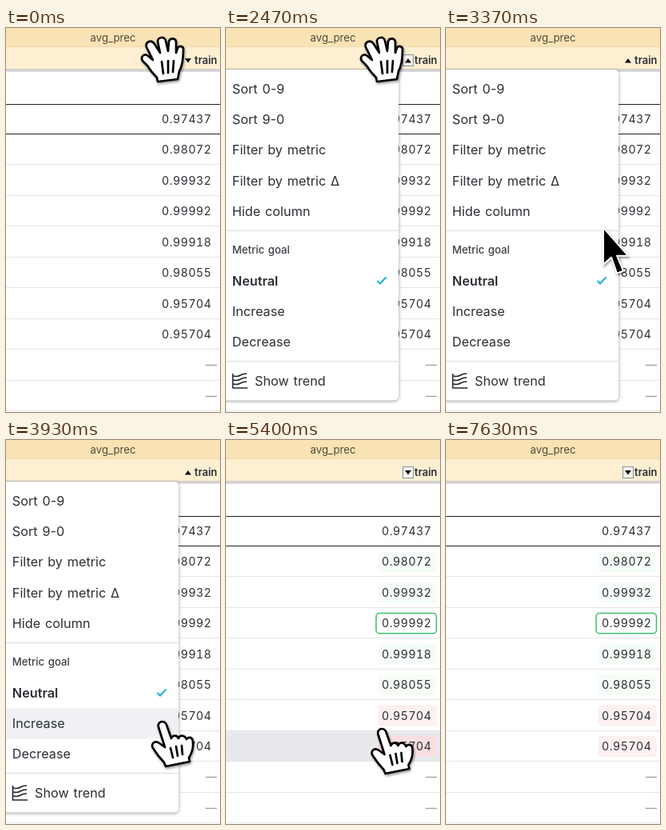
An HTML page for the animation above (7.66 s loop, 268x480 px).

```html
<!DOCTYPE html>
<html lang="en">
<head>
<meta charset="utf-8">
<style>
  html, body { margin: 0; width: 100%; height: 100%; overflow: hidden; background: #fff; }
  svg { display: block; width: 268px; height: 480px; font-family: Inter, Roboto, sans-serif; fill: #2a2e34; }
  .value { font-size: 14.2px; letter-spacing: .5px; text-anchor: end; font-variant-numeric: tabular-nums; }
  .item { font-size: 16.2px; letter-spacing: .04px; word-spacing: 1.2px; }
  .panel { filter: drop-shadow(0 1px 2px #0006); }
  .cursor { filter: drop-shadow(1px 2px 1.5px #0006); stroke-linejoin: round; stroke-linecap: round; }
  .hand { fill: #fff; stroke: #000; stroke-width: 2.7; }
</style>
</head>
<body>
<svg viewBox="0 0 268 480">
  <rect width="268" height="480" fill="#fff"/>
  <rect id="rowHover" width="268" height="38" fill="#e8e9ed"/>
  <g id="table"></g>

  <rect width="268" height="23" fill="#f9e3b4"/>
  <rect y="23" width="268" height="29" fill="#feefd2"/>
  <path d="M0 23.5H268" stroke="#eedbb2"/>
  <rect y="51" width="268" height="2" fill="#d2cdc8"/>
  <rect y="53" width="268" height="2" fill="#d9d9e0"/>
  <text x="134" y="17" font-size="13.2" text-anchor="middle" fill="#50493e">avg_prec</text>
  <rect id="focus" x="221.5" y="33.5" width="13" height="14" fill="#f7f3ea" stroke="#8792a5"/>
  <path id="sort" fill="#111"/>
  <text x="264.5" y="45" font-size="13" font-weight="600" text-anchor="end">train</text>

  <g id="menu">
    <rect class="panel" x="-8" y="52" width="224.2" height="413.5" rx="5" fill="#fff"/>
    <rect id="itemHover" width="216" height="38.4" fill="#f0f1f4"/>
    <path d="M0 253.5H216M0 416.5H216" stroke="#dcdde0"/>
    <g id="items"></g>
    <text x="7.8" y="282" font-size="13.2" font-weight="500" word-spacing="1" fill="#3b3f45">Metric goal</text>
    <path d="M189.5 316L193 319.5L200.5 311.5" fill="none" stroke="#14b4cf" stroke-width="2"/>
    <g fill="none" stroke="#24282d" stroke-width="1.6">
      <path d="M8.5 432V450H27"/>
      <path id="waves"/>
    </g>
  </g>

  <g id="open" class="cursor"><g transform="translate(-199 -41)">
    <path class="hand" d="M190 67L189 62C184 57 180 52 177 47L171 41C168 36 173 31 178 35L184 40L176 24C174 17 182 14 186 20L193 31L190 17C190 11 199 10 200 16L203 29L204 17C205 12 213 12 213 18L213 31L215 25C217 21 223 23 222 28C222 38 221 47 217 54L215 64Z"/>
    <path class="hand" d="M195 42L197 57M203 41V56M210 41L209 55"/>
  </g></g>
  <g id="point" class="cursor"><g transform="translate(-196.5 -356)">
    <path class="hand" d="M200 408L198 403C193 398 189 393 184 385C181 379 187 375 192 379L199 384L191 359C189 352 198 349 201 356L207 373C208 369 214 368 216 373C218 368 224 369 226 374C229 370 234 372 234 377C235 386 233 391 229 397L230 402Z"/>
    <path class="hand" d="M206 385L209 397M213 383L215 395M220 382L221 393"/>
  </g></g>
  <path id="arrow" class="cursor" d="M0 0V46L10 37L17 57L25 54L17 35H31Z" fill="#000" stroke="#fff" stroke-width="2"/>
</svg>
<script>
const LOOP = 7660, OPEN = 1200, PICK = 4300, GONE = 6200;
const PITCH = 38.45;
const $ = id => document.getElementById(id);
const show = (id, on) => $(id).style.display = on ? '' : 'none';

// Table rows
const values = ['0.97437', '0.98072', '0.99932', '0.99992', '0.99918', '0.98055', '0.95704', '0.95704'];
const chipColor = i => i > 5 ? '#fdf0f0' : '#f6fdf7';
let rows = '', chips = '';
for (let i = 0; i < 10; i++) {
  const y = 113.8 + i * PITCH, line = Math.round(133 + i * PITCH) - .5;
  rows += `<path d="M0 ${line}H268" stroke="${i ? '#e6e6e8' : '#222'}"/>`;
  rows += i < 8
    ? `<text class="value" x="257.5" y="${y + 5}">${values[i]}</text>`
    : `<path d="M250 ${Math.round(y) + .5}H264" stroke="#a2a2a2" stroke-width="1.4"/>`;
  if (i === 3) chips += `<rect x="188" y="${y - 12.6}" width="75.5" height="25.2" rx="4" fill="#fff" stroke="#3dbd6c" stroke-width="1.5"/>`;
  else if (i > 0 && i < 8) chips += `<rect id="chip${i}" x="190.5" y="${y - 13}" width="73.5" height="26" rx="4" fill="${chipColor(i)}"/>`;
}
$('table').innerHTML = `<path d="M0 95.5H268" stroke="#222"/><g id="chips">${chips}</g>${rows}`;

// Menu entries: label and vertical centre
const items = [['Sort 0-9', 76], ['Sort 9-0', 114.4], ['Filter by metric', 152.8], ['Filter by metric Δ', 191.2],
  ['Hide column', 229.6], ['Neutral', 316], ['Increase', 354.4], ['Decrease', 392.8], ['Show trend', 441]];
$('items').innerHTML = items.map(([label, y]) =>
  `<text class="item" x="${label === 'Show trend' ? 36 : 7.8}" y="${y + 5.5}"${label === 'Neutral' ? ' font-weight="600"' : ''}>${label}</text>`).join('');
$('waves').setAttribute('d', [435, 440, 445].map(y => `M9 ${y}c4 1 6 1 9 -1s5 -2 8 -2`).join(''));

// Cursor stops: time, x, y
const stops = [[0, 199, 41], [2470, 198, 41], [2700, 198, 41], [3800, 196.5, 356], [PICK, 196.5, 356],
  [4700, 196, 365], [5500, 196, 365], [GONE, 196, 490], [LOOP, 196, 490]];

function cursorAt(t) {
  const k = stops.findIndex(s => s[0] > t);
  const [t0, x0, y0] = stops[k - 1], [t1, x1, y1] = stops[k];
  const u = (t - t0) / (t1 - t0), e = u * u * (3 - 2 * u);
  return [x0 + (x1 - x0) * e, y0 + (y1 - y0) * e];
}

function draw(now) {
  const t = now % LOOP, [x, y] = cursorAt(t);
  const menu = t >= OPEN && t < PICK, picked = t >= PICK, inHeader = y < 52;

  show('menu', menu);
  show('chips', picked);
  show('focus', picked || (menu && inHeader));
  $('sort').setAttribute('d', menu ? 'M224 43.5L228 38L232 43.5Z' : 'M224 38L228 43.5L232 38Z');

  const item = menu && !inHeader && items.find(i => Math.abs(i[1] - y) <= 19.2);
  show('itemHover', item);
  if (item) $('itemHover').setAttribute('y', item[1] - 19.2);

  const row = Math.floor((y - 94.6) / PITCH);
  const rowOn = picked && t < GONE && y > 364;
  show('rowHover', rowOn);
  $('rowHover').setAttribute('y', 95 + row * PITCH);
  $('chip7').setAttribute('fill', rowOn && row === 7 ? '#f9dfe2' : chipColor(7));

  const shape = inHeader ? 'open' : menu && !item ? 'arrow' : 'point';
  for (const id of ['open', 'point', 'arrow']) show(id, id === shape && t < GONE);
  $(shape).setAttribute('transform', `translate(${x} ${y})`);
  requestAnimationFrame(draw);
}
draw(0);
</script>
</body>
</html>
```
